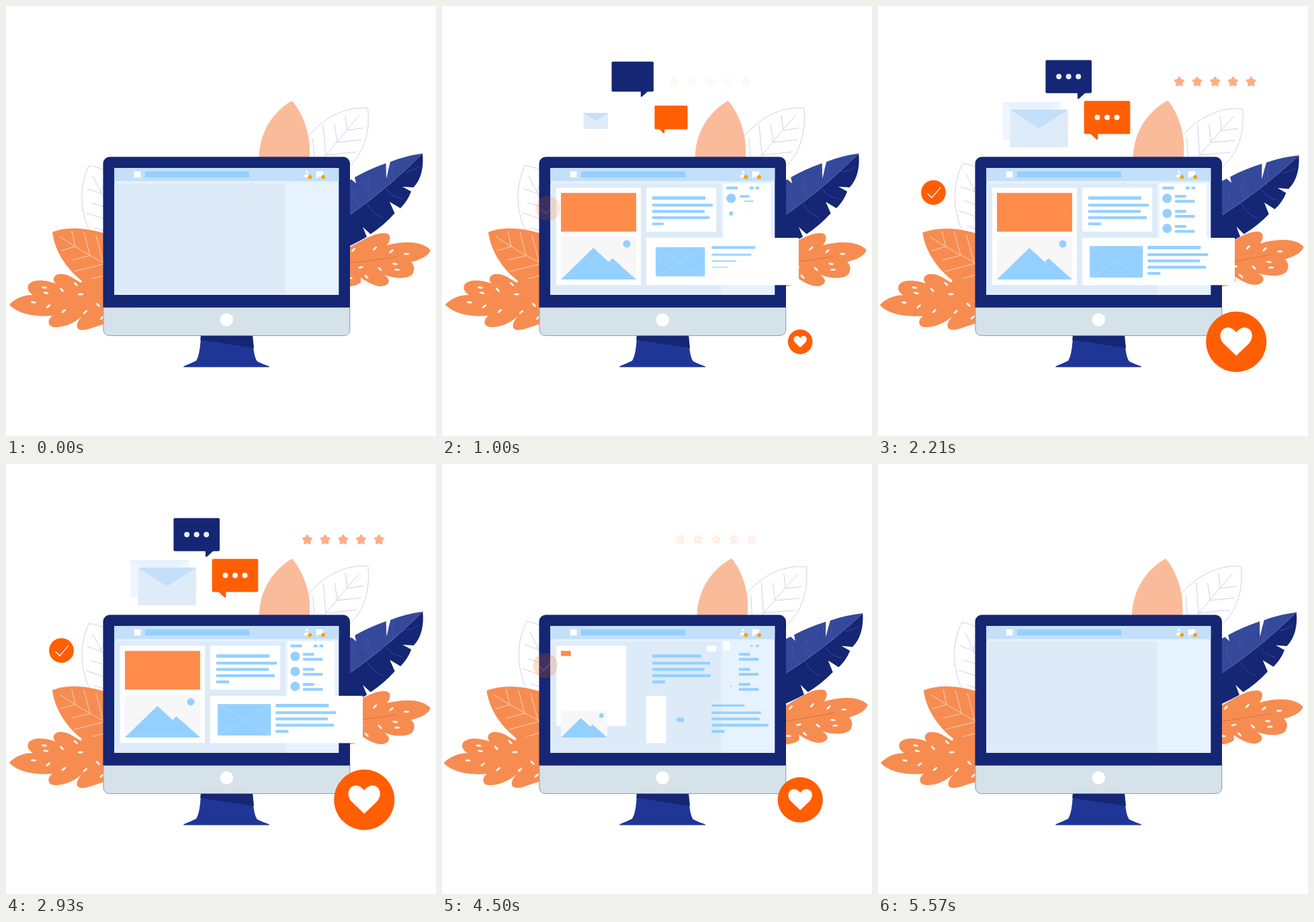
Write an HTML page with a canvas that moves like this. It is 640x640 px and loops after 5640 ms.

```html
<!DOCTYPE html>
<html lang="en">
<head>
<meta charset="utf-8">
<title>Desktop dashboard</title>
<style>
html, body { margin: 0; width: 100%; height: 100%; overflow: hidden; background: #fff; }
canvas { display: block; width: 100vmin; height: 100vmin; }
</style>
</head>
<body>
<canvas id="stage" width="640" height="640"></canvas>
<script>
const ctx = document.getElementById('stage').getContext('2d');
const LOOP = 5640, SWAY = 958, TAU = Math.PI * 2;
const C = {
  navy: '#152674', mid: '#34499a', stand: '#203697', leaf: '#f78c51', peach: '#fabb9b',
  hot: '#ff5e03', card: '#ff8c4a', sky: '#94d0ff', header: '#c3dffa', pale: '#ddebf9',
  side: '#e6f2fe', chin: '#d6e2e9', line: '#c6c1e8', amber: '#f4a30b', star: '#fdae86'
};

const smooth = p => { p = Math.min(1, Math.max(0, p)); return p * p * (3 - 2 * p); };
const ease = (t, start, d) => smooth((t - start) / d);
// 0 -> 1 from `start`, back to 0 from `end`
const show = (t, start, end, d = 480, dOut = d) => ease(t, start, d) * (1 - ease(t, end, dOut));

function rect(x, y, w, h, color) {
  ctx.fillStyle = color;
  ctx.fillRect(x, y, w, h);
}
function disc(x, y, r, color) {
  ctx.fillStyle = color;
  ctx.beginPath();
  ctx.arc(x, y, Math.max(0, r), 0, TAU);
  ctx.fill();
}
function fill(d, color) {
  ctx.fillStyle = color;
  ctx.fill(new Path2D(d));
}
function stroke(d, color, width = 0.8) {
  ctx.strokeStyle = color;
  ctx.lineWidth = width;
  ctx.stroke(new Path2D(d));
}
function scaled(x, y, sx, sy, draw) {
  if (sx < 0.004 || sy < 0.004) return;
  ctx.save();
  ctx.translate(x, y);
  ctx.scale(sx, sy);
  ctx.translate(-x, -y);
  draw();
  ctx.restore();
}
const grow = (x, y, s, draw) => scaled(x, y, s, s, draw);
function turned(x, y, angle, draw) {
  ctx.save();
  ctx.translate(x, y);
  ctx.rotate(angle);
  ctx.translate(-x, -y);
  draw();
  ctx.restore();
}
function seeds(list) {
  ctx.fillStyle = '#fff6ef';
  for (const [x, y, deg] of list) {
    ctx.beginPath();
    ctx.ellipse(x, y, 4, 1.5, deg * Math.PI / 180, 0, TAU);
    ctx.fill();
  }
}

function plants(t) {
  const s = (1 - Math.cos(TAU * t / SWAY)) / 2;

  turned(490, 330, 0.035 * s, () => {
    stroke('M440 206C468 168 502 149 538.5 152C542 188 534 218 508 242', C.line);
    stroke('M526 163Q506 185 470 230M508 185L505 163M508 185L532 181.5M493 203L489 177M493 203L529 199' +
      'M476 222L472 177M476 222L522 217M460 236L456.5 197', C.line);
  });
  turned(445, 320, 0.047 * s, () =>
    fill('M376.5 226C377 190 395 159 425.5 141C440 157 455 190 451.5 226L430 290Z', C.peach));

  turned(506, 313, -0.06 * s, () => {
    fill('M631.5 363C618 349 590 350 567 356C574 347 573 338 563 338C545 338 530 350 505 362L505 418' +
      'C515 417 524 416 528 411L528 404C540 413 555 420 564 416C573 412 571 406 563 400' +
      'C578 406 598 407 605 399C609 392 608 386 603 381C616 378 630 372 631.5 363Z', C.leaf);
    stroke('M582 373Q545 379 500 384', '#cf7340', 0.9);
    seeds([[517, 363, -45], [549, 361, -45], [573.5, 365, -40], [596, 369, 0], [579, 384, 8],
      [582, 392.5, 0], [556.5, 391.5, 45], [528, 389, -10], [536.5, 403, 45], [512, 405, 5]]);
  });

  turned(545, 400, 0.053 * s, () => {
    fill('M620 219.5C622 240 618 258 606.5 270L590 269L603 276Q598 290 587 301L571 291.5L578.5 308.5' +
      'Q562 327 542.5 339.5L531 329L537 343.5Q525 351 495 365L495 322Q560 280 620 219.5Z', C.navy);
    fill('M620 219.5Q594 223 572 232L566 257L565.5 234Q540 243 519 255L521 264L514 258L495 268L495 322' +
      'Q560 280 620 219.5Z', C.mid);
    stroke('M620 219.5Q565 275 495 322M517 272Q516 288 527 299M537 258Q532 275 543 287' +
      'M541 256Q536 272 547 283M572 235Q565 252 574 265M577 233Q570 250 579 260' +
      'M537 294Q545 309 561 315M566 272Q574 284 590 287M595 247Q607 245 615 239', '#6056b0', 0.6);
  });

  turned(235, 326, 0.045 * s, () => {
    stroke('M160 252Q140 239 123.5 237.5C107 272 110 312 132 350', C.line);
    stroke('M129 253L152 298M141 277L147 263M121 272L143 279.5M127 293L150 300M119.5 308L150 318' +
      'M132 330L150 336', C.line);
  });
  turned(105, 470, -0.03 * s, () => {
    fill('M69 336.5C95 327 128 330 165 345L165 425L114 410C93 394 73 368 69 336.5Z', C.leaf);
    stroke('M80 343Q110 364 160 390M98 335L103 357M82 364L103 358M116 336L125 371M98 378L125 371.5' +
      'M134 341L145 383M101 395L150 383M121 408L150 400', '#fde3d2');
  });
  turned(90, 790, -0.01 * s, () => {
    fill('M5 444.5C15 434 28 430 40 430C33 426 30 418 35 413C44 405 64 409 74 413C67 406 73 398 82 399' +
      'C94 399 102 407 112 412L114 406L165 406L165 470C138 473 126 482 115 482C103 483 103 473 113 462' +
      'C100 473 86 478 74 478C61 478 61 467 69 461C45 463 18 459 5 444.5Z', C.leaf);
    seeds([[57, 419, 8], [59.5, 427, 12], [83, 422.5, 48], [104, 414, 45], [111, 429, 0], [41, 441, 8],
      [63, 447, -40], [86, 454, -40], [118, 455.5, -42], [137, 445, 45], [143, 464, -42]]);
  });
}

function monitor() {
  fill('M290 490H367Q368 522 374 529Q382 533 391 536Q394 537.5 390 537.5H266Q262 537.5 266 535.5' +
    'Q275 532 283 528Q289 519 290 490Z', C.stand);
  fill('M290 490H367L369 509L289.3 497Z', C.navy);
  ctx.save();
  ctx.beginPath();
  ctx.roundRect(144.5, 224.5, 367.5, 266.3, 10);
  ctx.clip();
  rect(144, 224, 369, 225, C.navy);
  rect(144, 448.8, 369, 43, C.chin);
  ctx.restore();
  stroke('M145 448V481Q145 490.6 155 490.6H502Q511.8 490.6 511.8 481V448', '#7680b4');
  rect(145, 448.3, 47, 0.8, '#8d4a55');
  disc(328.3, 467, 9.8, '#fff');

  rect(161.3, 241, 334, 189, C.side);
  rect(161.3, 264, 254.2, 166, C.pale);
  rect(161.3, 241, 334, 19.6, C.header);
  rect(190.8, 246, 9.8, 9.3, '#fff');
  rect(207, 246.3, 155, 8.8, C.sky);
  disc(448, 247, 2.1, '#fff');
  fill('M443 255Q443.5 250.5 448 250.5Q451.5 250.5 452 255Z', '#fff');
  fill('M461.5 246H472V254H465L462 257Z', '#fff');
  disc(452.3, 254.5, 3, C.amber);
  disc(472, 254.5, 3, C.amber);
}

function textLines(t, x, y, start, ends) {
  [79, 90, 78, 87, 19].forEach((w, i) => {
    const top = y + i * 9.3 + (i ? 1.7 : 0);
    grow(x, top + 2.3, show(t, start + i * 60, ends[i]), () => rect(x, top, w, i ? 4.2 : 5, C.sky));
  });
}

function cards(t) {
  grow(170, 270.5, show(t, 87, 4373), () => rect(170, 270.5, 126, 144.7, '#fff'));
  grow(177, 278.2, show(t, 169, 4130), () => rect(177, 278.2, 112, 57.6, C.card));
  grow(177, 407, show(t, 169, 4298), () => {
    rect(177, 342.7, 112, 64.3, '#f7f7f7');
    fill('M177 407L225.3 360L248 381L253.7 375.5L289 407Z', C.sky);
    disc(275, 354, 5.5, C.sky);
  });
  grow(408.2, 270.5, show(t, 169, 4130), () => rect(304, 270.5, 104.2, 65.3, '#fff'));
  textLines(t, 313, 283.3, 380, [4418, 4440, 4485, 4495, 4500]);

  grow(418.5, 264, show(t, 169, 4135), () => rect(418.5, 264, 70.7, 91, '#fff'));
  const bar = (x, y, w, a, b) =>
    grow(x + w / 2, y + 2, show(t, a, b), () => rect(x, y, w, 4.1, C.sky));
  bar(423.3, 268.7, 17, 455, 4060);
  bar(458, 268.7, 5.6, 500, 4295);
  bar(466.5, 268.7, 5.6, 540, 4375);
  for (let i = 0; i < 3; i++) {
    const dy = i * 22.4, a = 510 + i * 270;
    disc(430.3, 286.3 + dy, 7 * show(t, a, 4040 + i * 55), C.sky);
    bar(442, 281.2 + dy, 16.7, a + 128, 4460 + i * 20);
    bar(442, 288.6 + dy, 29.4, a + 265, 4480 + i * 20);
  }

  scaled(304, 345, show(t, 387, 4130), 1, () => rect(304, 345, 227, 70.4, '#fff'));
  grow(354.7, 380.7, show(t, 600, 4130), () => {
    rect(315.2, 357.3, 79, 46.8, C.sky);
    stroke('M315.2 357.3L394.2 404.1M394.2 357.3L315.2 404.1', '#b4dfff', 0.7);
  });
  textLines(t, 401.3, 357, 650, [4300, 4370, 4415, 4455, 4495]);
}

function bubble(t, x, y, start, color, dotColor, tail) {
  grow(x, y + 24.7, show(t, start, 3830, 480, 640), () => {
    ctx.fillStyle = color;
    ctx.beginPath();
    ctx.roundRect(x - 34.3, y, 68.6, 49.3, 2);
    ctx.fill();
    fill(tail, color);
  });
  for (let i = 0; i < 3; i++) {
    disc(x + (i - 1) * 14.5, y + 24.5, 4 * show(t, start + 400 + i * 80, 4100 - i * 60, 320, 460), dotColor);
  }
}

function envelope(x, y, body, flap) {
  rect(x, y, 86.5, 56.2, body);
  fill(`M${x} ${y}h86.5l-43.2 28Z`, flap);
}

function extras(t) {
  const mail = show(t, 800, 4080, 450, 360);
  const slide = 11.2 * show(t, 1415, 3870, 320, 300);
  grow(229, 171, mail, () => {
    envelope(185.3, 143, '#eff6fe', '#e7f2fe');
    envelope(185.3 + slide, 143 + slide, '#deebf9', C.header);
  });
  bubble(t, 283.7, 80.5, 610, C.navy, '#e9effc', 'M297 129V138H299L309 129Z');
  bubble(t, 341, 141.2, 690, C.hot, '#fff', 'M316 190L325 198.5H327.3V190Z');

  const stars = show(t, 930, 4137);
  ctx.save();
  ctx.globalAlpha = stars;
  ctx.translate(-110 * (1 - stars), 0);
  ctx.fillStyle = ctx.strokeStyle = C.star;
  ctx.lineWidth = 2;
  ctx.lineJoin = 'round';
  for (let n = 0; n < 5; n++) {
    ctx.beginPath();
    for (let i = 0; i < 10; i++) {
      const r = i % 2 ? 4 : 7, a = i * Math.PI / 5 - Math.PI / 2;
      ctx.lineTo(448.4 + n * 26.7 + r * Math.cos(a), 112.8 + r * Math.sin(a));
    }
    ctx.closePath();
    ctx.fill();
    ctx.stroke();
  }
  ctx.restore();

  const tick = show(t, 880, 4158);
  ctx.save();
  ctx.globalAlpha = tick;
  ctx.translate(89 * (1 - tick), 28 * (1 - tick));
  disc(82.5, 277.6, 18.4, C.hot);
  stroke('M73.5 279L80 285.3L93.3 269.8', '#fff', 1.2);
  ctx.restore();

  // pops past full size, then settles; leaves the same way
  const pop = t < 2700
    ? 1.2 * ease(t, 860, 360) - 0.2 * ease(t, 1220, 410)
    : 1 + 0.2 * ease(t, 3862, 489) - 1.2 * ease(t, 4351, 360);
  grow(533.2, 499.8, pop, () => {
    disc(533.2, 499.8, 45, C.hot);
    ctx.translate(533.2, 499.8);
    fill('M0 20.7L-18.5 3C-33 -13 -14 -32 0 -14C14 -32 33 -13 18.5 3Z', '#fff');
  });
}

function frame(now) {
  const t = now % LOOP;
  rect(0, 0, 640, 640, '#fff');
  plants(t);
  monitor();
  cards(t);
  extras(t);
}

const began = performance.now();
function tickLoop() {
  frame(performance.now() - began);
  requestAnimationFrame(tickLoop);
}
tickLoop();
</script>
</body>
</html>
```
